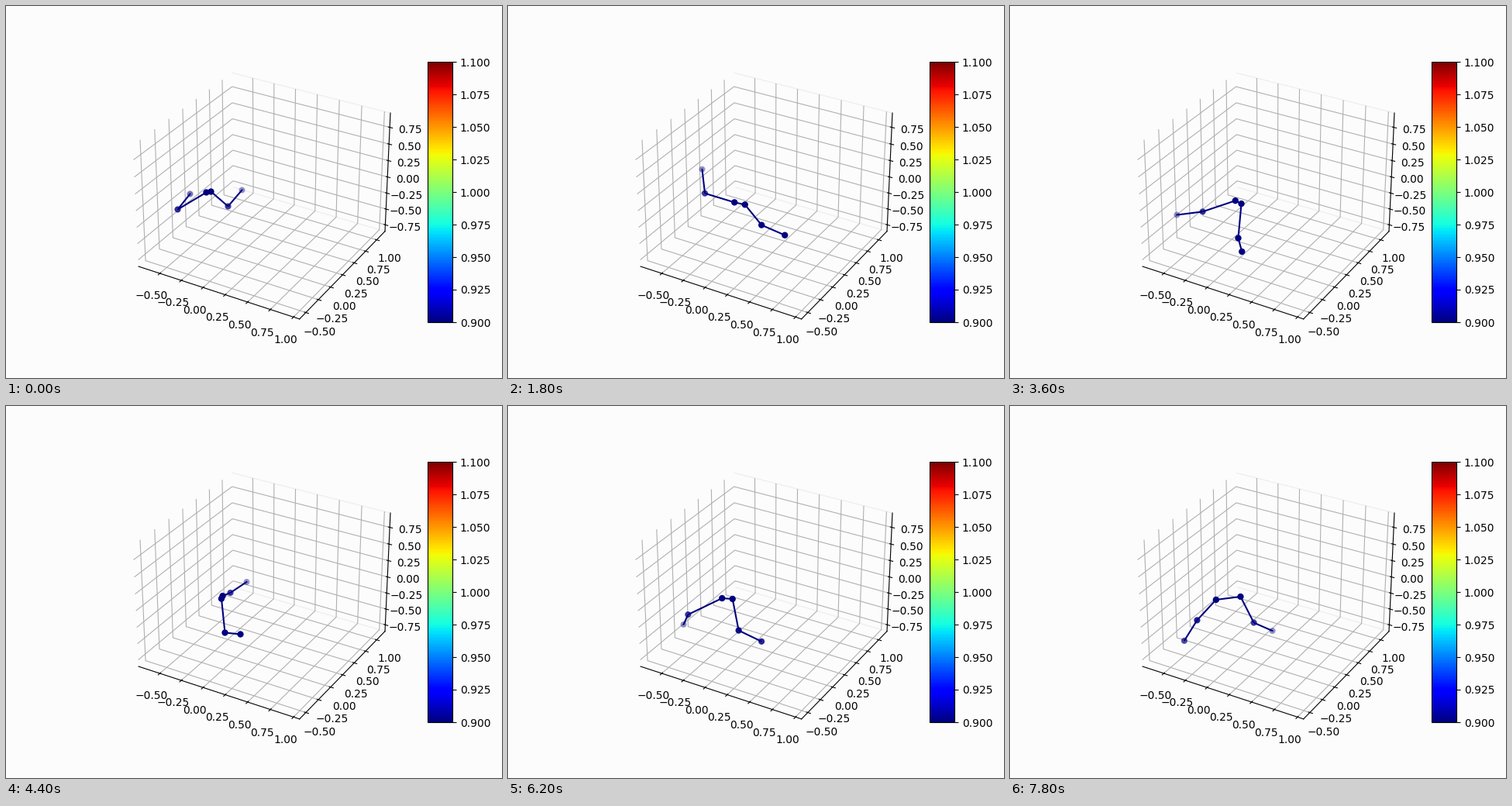
These frames come from a looping animation (640 by 480 pixels, 8 s). A matplotlib script:

```python
import numpy as np
import matplotlib.pyplot as plt
from matplotlib.animation import FuncAnimation
from matplotlib.cm import ScalarMappable
from matplotlib.colors import Normalize

W, H, DPI = 640, 480, 100
FRAMES, STEP_MS = 40, 200
PAPER = "#fcfcfc"
JET = plt.get_cmap("jet")
NAVY = JET(0)

# Key points of the body as x + yj in stage pixels, at the frames in KEYS
KEYS = np.array([0, 4, 14, 22, 28, 35])
SHIFT = np.array([0, .33, 1, .36, .45, .42])
HALF_SPAN = np.array([3-.5j, 3.2+.5j, 8.8+2j, -.8+1.8j, 1.5+1.8j, 15.8-2j])
LEFT_ELBOW = np.array([221+262j, 245+258j, 290+267j, 289+240.5j, 235.5+260j, 238.5+279.5j])
LEFT_HAND = np.array([237+242j, 267+240j, 297+265.5j, 310+226.5j, 238+263j, 222+306j])
RIGHT_ELBOW = np.array([286+258j, 302.5+283j, 335.5+273j, 282+292j, 286+296j, 316.5+275.5j])
RIGHT_HAND = np.array([304+237j, 333.5+293j, 358+275j, 302+294j, 317+310.5j, 340.5+286j])


def glide(values, frame):
    """Smooth cubic path through key values."""
    frame = min(frame, KEYS[-1])
    k = min(np.searchsorted(KEYS, frame, side="right") - 1, len(KEYS) - 2)
    span = KEYS[k + 1] - KEYS[k]
    t = (frame - KEYS[k]) / span
    ease = t * t * (3 - 2 * t)
    slopes = np.gradient(values, KEYS)
    return (values[k] + (values[k + 1] - values[k]) * ease
            + span * t * (1 - t) * (slopes[k] * (1 - t) - slopes[k + 1] * t))


def pulse(frame, start, end):
    """Rise to 1 and back to 0 between two frames."""
    return np.sin(np.pi * np.clip((frame - start) / (end - start), 0, 1)) ** 2


def joints(frame):
    """Chain from the left hand over both shoulders to the right hand."""
    middle = 261 + 239.5j + glide(SHIFT, frame) * (48 + 19j)
    half = glide(HALF_SPAN, frame)
    sway = max(frame - KEYS[-1], 0) * (.6 - .9j)
    left = pulse(frame, 4, 14) * (-37 - 45j) + pulse(frame, 14, 22) * (-97 + 26j)
    right = pulse(frame, 0, 4) * (42 + 8j) + pulse(frame, 14, 22) * (-30 + 34j)
    chain = np.array([
        glide(LEFT_HAND, frame) + left + sway,
        glide(LEFT_ELBOW, frame) + left / 2 + sway,
        middle - half,
        middle + half,
        glide(RIGHT_ELBOW, frame) + right / 2 - sway,
        glide(RIGHT_HAND, frame) + right - sway,
    ])
    return np.column_stack([chain.real, chain.imag])


def joint_colors(points):
    """The higher hand is farther away, so it fades; elbows fade half as much."""
    hands = points[[0, 5], 1]
    left, right = np.clip(.3 + .02 * (hands - hands.min()), 0, 1)
    rgba = np.tile(NAVY, (6, 1))
    rgba[:, 3] = left, (1 + left) / 2, 1, 1, (1 + right) / 2, right
    return rgba


fig = plt.figure(figsize=(W / DPI, H / DPI), dpi=DPI, facecolor=PAPER)

# Empty 3D box
box = fig.add_subplot(projection="3d", facecolor=PAPER)
SIDES = zip((box.xaxis, box.yaxis, box.zaxis),
            (box.set_xlim, box.set_ylim, box.set_zlim),
            (0.157, 0.2843, 0.054),
            (-0.5, -0.5, -0.75),
            ("none", "#efefef", "none"))
for axis, set_lim, center, first, edge in SIDES:
    set_lim(center - 0.9075, center + 0.9075)
    axis.set_ticks(first + 0.25 * np.arange(7))
    axis.pane.set_alpha(None)
    axis.pane.set_facecolor("none")
    axis.pane.set_edgecolor(edge)

# Colour scale, widened by matplotlib around the single value 1
bar = fig.add_axes([0.85, 0.15, 0.05, 0.7])
fig.colorbar(ScalarMappable(Normalize(1, 1), JET), cax=bar)

# Chain, in coordinates of pixel centres
stage = fig.add_axes([0, 0, 1, 1], zorder=5)
stage.set(xlim=(-0.5, W - 0.5), ylim=(H - 0.5, -0.5))
stage.axis("off")
line, = stage.plot([], [], color=NAVY, lw=1.5)
dots = stage.scatter(*joints(0).T, s=20, linewidths=1.5, zorder=3)


def draw(frame):
    points = joints(frame)
    colors = joint_colors(points)
    line.set_data(*points.T)
    dots.set_offsets(points)
    dots.set_facecolor(colors)
    dots.set_edgecolor(colors)
    return line, dots


anim = FuncAnimation(fig, draw, frames=FRAMES, interval=STEP_MS,
                     repeat=True, repeat_delay=0, blit=False)
plt.show()
```
